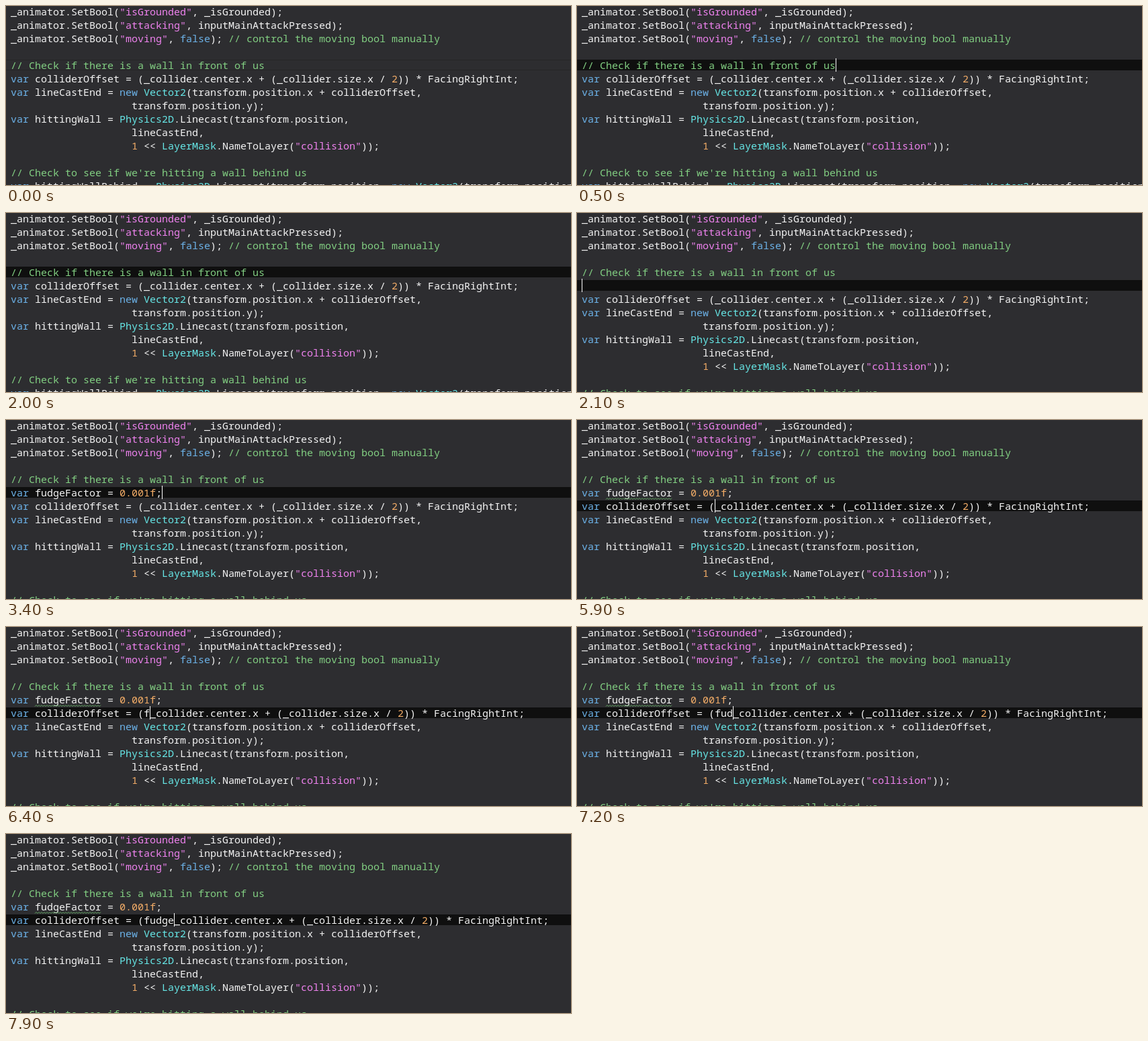
Write an HTML page with a canvas that moves like this. It is 841 px wide and 267 px high and loops after 8000 ms.

```html
<!DOCTYPE html>
<html lang="en">
<head>
<meta charset="utf-8">
<style>
  html, body { margin: 0; width: 100%; height: 100%; overflow: hidden; background: #2d2d30; }
  canvas { display: block; }
</style>
</head>
<body>
<canvas id="stage" width="841" height="267"></canvas>
<script>
const ctx = document.getElementById('stage').getContext('2d');
const LOOP = 8000, LEFT = 7, TOP = -2, CELL = 9, LINE = 20, BASELINE = 16;
const COLORS = {
  back: '#2d2d30', plain: '#f4f4f4', comment: '#82cf82', string: '#ee82ee',
  number: '#f5ae68', keyword: '#6cb2e8', type: '#66e6e6',
  active: '#0f0f0f', inactive: '#252526', squiggle: '#62a862'
};

const INDENT = ' '.repeat(20);
const HEAD = [
  '_animator.SetBool("isGrounded", _isGrounded);',
  '_animator.SetBool("attacking", inputMainAttackPressed);',
  '_animator.SetBool("moving", false); // control the moving bool manually',
  '',
  '// Check if there is a wall in front of us'
];
const TAIL = [
  'var lineCastEnd = new Vector2(transform.position.x + colliderOffset,',
  INDENT + 'transform.position.y);',
  'var hittingWall = Physics2D.Linecast(transform.position,',
  INDENT + 'lineCastEnd,',
  INDENT + '1 << LayerMask.NameToLayer("collision"));',
  '',
  "// Check to see if we're hitting a wall behind us",
  'var hittingWallBehind = Physics2D.Linecast(transform.position, new Vector2(transform.position.x,'
];
const DECLARATION = 'var fudgeFactor = 0.001f;';

// Each step changes only the listed parts of the editor state.
const STEPS = [
  [0, { row: 4, col: 42, caret: false, focus: false, inserted: false, declared: false, warned: false, typed: 0 }],
  [500, { focus: true, caret: true }],
  [1000, { caret: false }],
  [1500, { caret: true }],
  [2000, { caret: false }],
  [2100, { inserted: true, row: 5, col: 0, caret: true }],
  [2400, { caret: false }],
  [2800, { declared: true, col: 25, caret: true }],
  [2900, { caret: false }],
  [3400, { caret: true }],
  [3900, { caret: false }],
  [4100, { caret: true }],
  [4400, { warned: true, caret: false }],
  [4700, { row: 6, caret: true }],
  [4800, { row: 8, caret: false }],
  [4900, { row: 6, caret: true }],
  [5000, { col: 23 }],
  [5300, { col: 22 }],
  [5400, { caret: false }],
  [5900, { caret: true }],
  [6200, { typed: 1, col: 23 }],
  [6500, { typed: 2, col: 24 }],
  [6800, { caret: false }],
  [7000, { typed: 3, col: 25, caret: true }],
  [7300, { caret: false }],
  [7800, { typed: 4, col: 26, caret: true }],
  [7900, { typed: 5, col: 27 }]
];

const TOKEN = /(?<comment>\/\/.*)|(?<string>"[^"]*")|(?<keyword>\b(?:var|new|false)\b)|(?<type>\b(?:Vector2|Physics2D|LayerMask)\b)|(?<number>\b\d[\d.]*f?)|(?<plain>[A-Za-z_]\w*|[^\w\s])/g;

const columnX = col => LEFT + col * CELL;
const rowY = row => TOP + row * LINE;

function stateAt(time) {
  const state = {};
  for (const [start, change] of STEPS) if (start <= time) Object.assign(state, change);
  return state;
}

function codeLines({ inserted, declared, typed }) {
  const offset = `var colliderOffset = (${'fudge'.slice(0, typed)}_collider.center.x + (_collider.size.x / 2)) * FacingRightInt;`;
  return [...HEAD, ...(inserted ? [declared ? DECLARATION : ''] : []), offset, ...TAIL];
}

function drawLine(text, row) {
  for (const match of text.matchAll(TOKEN)) {
    const kind = Object.keys(match.groups).find(name => match.groups[name]);
    ctx.fillStyle = COLORS[kind];
    ctx.fillText(match[0], columnX(match.index), rowY(row) + BASELINE);
  }
}

function drawHighlight(row, focus) {
  const y = rowY(row) + 2;
  ctx.fillStyle = focus ? COLORS.active : COLORS.inactive;
  if (focus) {
    ctx.fillRect(0, y, 841, 16);
  } else {
    ctx.fillRect(0, y, 841, 1);
    ctx.fillRect(0, y + 15, 841, 1);
  }
}

function drawSquiggle(row, from, to) {
  const y = rowY(row) + 18.5;
  ctx.strokeStyle = COLORS.squiggle;
  ctx.lineWidth = 1;
  ctx.beginPath();
  for (let x = columnX(from), i = 0; x <= columnX(to); x += 2, i++) ctx.lineTo(x, y + (i % 2 ? 0 : 2));
  ctx.stroke();
}

function render(time) {
  const state = stateAt(time);
  ctx.fillStyle = COLORS.back;
  ctx.fillRect(0, 0, 841, 267);
  drawHighlight(state.row, state.focus);
  ctx.font = '15px "Noto Sans Mono", monospace';
  codeLines(state).forEach(drawLine);
  if (state.warned) drawSquiggle(5, 4, 15);
  if (state.caret) {
    ctx.fillStyle = '#ffffff';
    ctx.fillRect(columnX(state.col), rowY(state.row), 1, LINE);
  }
}

const begin = performance.now();
function tick() {
  render((performance.now() - begin) % LOOP);
  requestAnimationFrame(tick);
}
tick();
</script>
</body>
</html>
```
